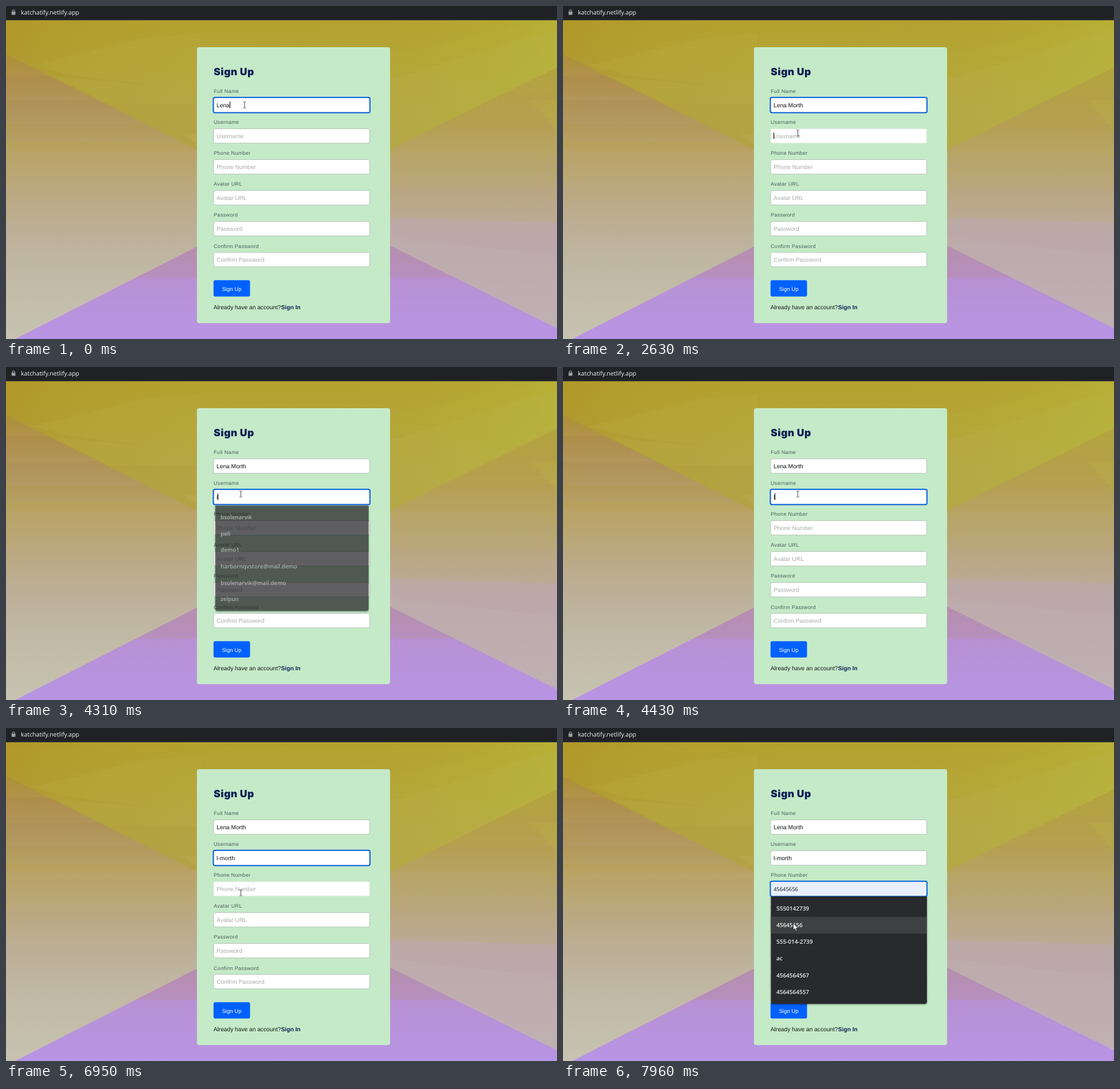
An HTML page with a canvas that plays this animation: 963 px wide and 582 px high, repeating every 8000 ms.

```html
<!DOCTYPE html>
<html lang="en">
<head>
<meta charset="utf-8">
<title>Sign Up</title>
<style>
  html, body { margin: 0; width: 100%; height: 100%; overflow: hidden; background: #202124; }
  canvas { display: block; }
</style>
</head>
<body>
<canvas id="stage" width="963" height="582"></canvas>
<script>
const W = 963, H = 582, LOOP = 8000;
const ARIAL = '"Liberation Sans", Arial, sans-serif';
const UI = '"Open Sans", "Noto Sans", sans-serif';
const ctx = document.getElementById('stage').getContext('2d');

const FULL_NAME = 'Lena Morth', USERNAME = 'l-morth';
const labels = ['Full Name', 'Username', 'Phone Number', 'Avatar URL', 'Password', 'Confirm Password'];
const menus = {
  1: ['bsolenarvik', 'peli', 'demo1', 'harbornqvstore@mail.demo', 'bsolenarvik@mail.demo', 'zelpun'],
  2: ['5550142739', '45645656', '555-014-2739', 'ac', '4564564567', '4564564557']
};

// Each cue changes part of the state from its time on.
const cues = [
  [0, { name: 4, user: 0, caret: 0, focus: 0, hover: -1, fading: -1, menu: 0, closing: false,
        row: -1, preview: '', x: 417, y: 173, arrow: false }],
  [130, { name: 5 }], [580, { caret: -1 }],
  [700, { name: 6, caret: 0 }], [830, { name: 7 }],
  [1120, { name: 8 }], [1240, { name: 9 }], [1370, { name: 10 }],
  [1910, { caret: -1 }],
  [2050, { x: 416, y: 181 }], [2190, { x: 413, y: 204 }], [2330, { x: 410.5, y: 222, hover: 1 }],
  [2630, { caret: 1 }],
  [2750, { focus: 1, hover: -1, menu: 1, fading: 0 }], [2900, { fading: -1 }],
  [3170, { caret: -1 }], [3740, { caret: 1 }],
  [4310, { user: 1, closing: true }], [4430, { menu: 0, closing: false }],
  [4840, { caret: -1 }], [5130, { user: 2, caret: 1 }],
  [5400, { user: 3 }], [5540, { user: 4 }], [5680, { user: 5 }], [5810, { user: 6 }], [5950, { user: 7 }],
  [6520, { caret: -1 }],
  [6660, { y: 234 }], [6800, { y: 265 }], [6950, { y: 288, hover: 2 }],
  [7260, { caret: 2, focus: 2, hover: -1, menu: 2, fading: 1 }], [7410, { fading: -1 }],
  [7680, { caret: -1 }],
  [7820, { x: 407, y: 316, arrow: true, row: 0, preview: menus[2][0] }],
  [7960, { x: 402.5, y: 341.5, row: 1, preview: menus[2][1] }]
];

const stateAt = t => Object.assign({}, ...cues.filter(c => c[0] <= t).map(c => c[1]));
const fieldTop = i => 160.4 + i * 54;

function text(c, str, x, y, font, color, spacing = 0) {
  c.font = font;
  c.letterSpacing = spacing + 'px';
  c.textRendering = 'geometricPrecision';
  c.fillStyle = color;
  c.fillText(str, x, y);
}

function box(c, x, y, w, h, r, fill, stroke, line = 1) {
  c.beginPath();
  c.roundRect(x, y, w, h, r);
  if (fill) { c.fillStyle = fill; c.fill(); }
  if (stroke) { c.strokeStyle = stroke; c.lineWidth = line; c.stroke(); }
}

function polygon(c, points, fill) {
  c.beginPath();
  points.forEach(p => c.lineTo(p[0], p[1]));
  c.closePath();
  c.fillStyle = fill;
  c.fill();
}

function gradient(c, x0, y0, x1, y1, stops) {
  const g = c.createLinearGradient(x0, y0, x1, y1);
  const length = Math.hypot(x1 - x0, y1 - y0);
  stops.forEach(([at, color]) => g.addColorStop(at / length, color));
  return g;
}

// Saw-toothed slope between two points, closed through the given corners.
function ridge(c, x0, y0, x1, y1, teeth, corners, fill) {
  const points = [];
  const dx = (x1 - x0) / teeth, dy = (y1 - y0) / teeth;
  for (let i = 0; i < teeth; i++) {
    const x = x0 + dx * i, y = y0 + dy * i;
    points.push([x, y], [x + dx * 1.5, y + dy * 0.55], [x + dx * 0.9, y + dy * 0.95]);
  }
  polygon(c, [...points, [x1, y1], ...corners], fill);
}

function paintBackdrop(c) {
  const mid = [502, 335];
  const left = [[84, '#ae8f37'], [121, '#b1934a'], [122, '#ae8d48'], [164, '#b2955a'], [165, '#b09157'],
    [207, '#b39a60'], [208, '#b39859'], [236, '#b6a064'], [238, '#b79f5b'], [261, '#baa469'],
    [262, '#b9a368'], [315, '#baa97c'], [316, '#baa77f'], [377, '#bcae91'], [379, '#bcad94'],
    [450, '#c0b7a3'], [582, '#c7c3b1']];
  const right = [[107, '#b3a43d'], [150, '#b4a246'], [152, '#b4a045'], [205, '#b5a151'], [207, '#b59f52'],
    [258, '#b7a565'], [260, '#b7a467'], [317, '#b9a77c'], [318, '#b9a680'], [371, '#bbaa92'],
    [430, '#bbaaa5'], [582, '#c0b9b5']];
  c.fillStyle = gradient(c, 0, 0, 0, H, left);
  c.fillRect(0, 0, 502, H);
  c.fillStyle = gradient(c, 0, 0, 0, H, right);
  c.fillRect(502, 0, 461, H);

  polygon(c, [[660, 370], [W, 379], [W, H], [660, 470]], 'rgba(188,165,182,.45)');
  polygon(c, [[660, 402], [W, 437], [W, H], [660, 470]], 'rgba(192,178,175,.3)');
  ridge(c, 915, 165, W, 222, 6, [[W, 165]], 'rgba(184,174,66,.3)');

  c.save();
  c.beginPath();
  [[0, 25], [W, 25], [W, 107], mid, [0, 84]].forEach(p => c.lineTo(p[0], p[1]));
  c.clip();
  c.fillStyle = gradient(c, 0, 0, 0, 335,
    [[25, '#b4a12d'], [70, '#b3a336'], [125, '#b3a43e'], [180, '#b2a447'], [260, '#b2a24d']]);
  c.fillRect(0, 25, W, 310);
  c.fillStyle = gradient(c, 0, 0, W, 0,
    [[0, 'rgba(174,143,35,.5)'], [330, 'rgba(182,164,45,.18)'], [672, 'rgba(182,168,48,.2)'], [W, 'rgba(184,182,58,.65)']]);
  c.fillRect(0, 25, W, 310);
  ridge(c, 40, 103, 225, 58, 9, [[340, 48], [340, 148], [120, 122]], 'rgba(187,174,67,.28)');
  polygon(c, [[85, 124], [340, 146], [340, 172], [180, 172]], 'rgba(184,171,72,.3)');
  ridge(c, 672, 125, 940, 43, 13, [[W, 42], [W, 125], [672, 250]], 'rgba(187,181,73,.26)');
  ridge(c, 672, 84, 850, 44, 8, [[W, 25], [W, 42], [672, 125]], 'rgba(185,176,50,.2)');
  ridge(c, 305, 224, 340, 248, 4, [[340, 224]], 'rgba(188,172,84,.45)');
  c.restore();

  polygon(c, [mid, [16, 582], [1001, 582]], gradient(c, 0, 0, 0, H,
    [[335, '#b48f9f'], [420, '#b58eae'], [474, '#b78fbe'], [476, '#b891d3'], [H, '#b894e5']]));

  c.fillStyle = '#202124';
  c.fillRect(0, 0, W, 25);
  c.fillStyle = '#303135';
  c.fillRect(0, 23.5, W, 1.5);
  box(c, 9.7, 9.8, 6.8, 5.8, 1, '#9aa0a6');
  c.beginPath();
  c.moveTo(11, 10);
  c.lineTo(11, 8.8);
  c.arc(13.1, 8.8, 2.1, Math.PI, 0);
  c.lineTo(15.2, 10);
  c.strokeStyle = '#9aa0a6';
  c.lineWidth = 1.1;
  c.stroke();
  text(c, 'katchatify.netlify.app', 26, 15, '10.6px ' + UI, '#f1f3f4');
}

function paintCard(c) {
  box(c, 333.7, 72, 337.6, 482.3, 4, '#c5eac8');
  text(c, 'Sign Up', 363, 121, '900 17.6px Inter, sans-serif', '#0b1f54', 0.5);
  labels.forEach((label, i) =>
    text(c, label, 363, fieldTop(i) - 8.4 + i * 0.1, '9px ' + ARIAL, '#4b5c5b', 0.34));
  box(c, 362.7, 479.3, 63.8, 28.4, 3, '#0061fe');
  text(c, 'Sign Up', 377.4, 497.6, '9.6px ' + ARIAL, '#fff');
  text(c, 'Already have an account?', 362.7, 529.6, '10.2px ' + ARIAL, '#161c18');
  text(c, 'Sign In', 480.8, 529.6, 'bold 10.2px ' + ARIAL, '#0b1f54');
}

function drawField(i, s) {
  const top = fieldTop(i), typed = [FULL_NAME.slice(0, s.name), USERNAME.slice(0, s.user), s.preview][i] || '';
  const preview = i === 2 && s.preview;
  const border = i === s.hover ? '#d5ead9' : i === s.fading ? '#8ba9ca' : '#b4c3b7';
  box(ctx, 362.9, top + 0.1, 272.8, 25.3, 3, preview ? '#e8f0fe' : '#fff', border);
  if (i === s.focus) box(ctx, 362.3, top - 0.6, 273.9, 26.6, 3, null, '#0b63e5', 2);
  text(ctx, typed || labels[i], 368, top + 16.1,
    preview ? '9.4px ' + UI : '10.24px ' + ARIAL, typed ? '#111' : '#aaa');
  if (i === s.caret) {
    const x = 368 + (typed ? ctx.measureText(typed).width : 0);
    ctx.fillStyle = '#000';
    ctx.fillRect(Math.round(x), Math.round(top + 6.6), 1, 11.5);
  }
}

function drawMenu(s) {
  const top = 240.6 + (s.menu - 1) * 54;
  ctx.save();
  if (s.closing) {
    ctx.globalAlpha = 0.59;
    ctx.translate(499.7, top + 93.7);
    ctx.scale(0.984, 0.984);
    ctx.translate(-499.7, -top - 93.7);
  }
  ctx.save();
  ctx.shadowColor = 'rgba(0,0,0,.55)';
  ctx.shadowBlur = 3;
  ctx.shadowOffsetY = 1;
  box(ctx, 363.5, top, 272.5, 187.4, [0, 0, 4, 4], '#292a2d');
  ctx.restore();
  if (s.row >= 0) {
    ctx.fillStyle = '#3f4042';
    ctx.fillRect(363.5, top + 6.4 + s.row * 29.1, 272.5, 29.1);
  }
  menus[s.menu].forEach((item, i) =>
    text(ctx, item, 373, top + 24.5 + i * 29.1, '600 10px ' + UI, '#eceef0'));
  ctx.restore();
}

function drawPointer({ x, y, arrow }) {
  ctx.save();
  ctx.translate(x, y);
  if (arrow) {
    const shape = new Path2D('M0 0V11.5L2.7 9.1L4.5 13L6.3 12.2L4.6 8.4H8.2Z');
    ctx.fillStyle = '#fff';
    ctx.fill(shape);
    ctx.strokeStyle = '#111';
    ctx.lineWidth = 0.7;
    ctx.stroke(shape);
  } else {
    ctx.strokeStyle = '#333';
    ctx.lineWidth = 0.9;
    ctx.stroke(new Path2D('M0 -4.5V4.5M-2.4 -5.2H-.8L0 -4.4L.8 -5.2H2.4M-2.4 5.2H-.8L0 4.4L.8 5.2H2.4'));
  }
  ctx.restore();
}

const still = document.createElement('canvas');
still.width = W;
still.height = H;
paintBackdrop(still.getContext('2d'));
paintCard(still.getContext('2d'));

const start = performance.now();
function frame() {
  const s = stateAt((performance.now() - start) % LOOP);
  ctx.drawImage(still, 0, 0);
  labels.forEach((_, i) => drawField(i, s));
  if (s.menu) drawMenu(s);
  drawPointer(s);
  requestAnimationFrame(frame);
}
frame();
</script>
</body>
</html>
```
